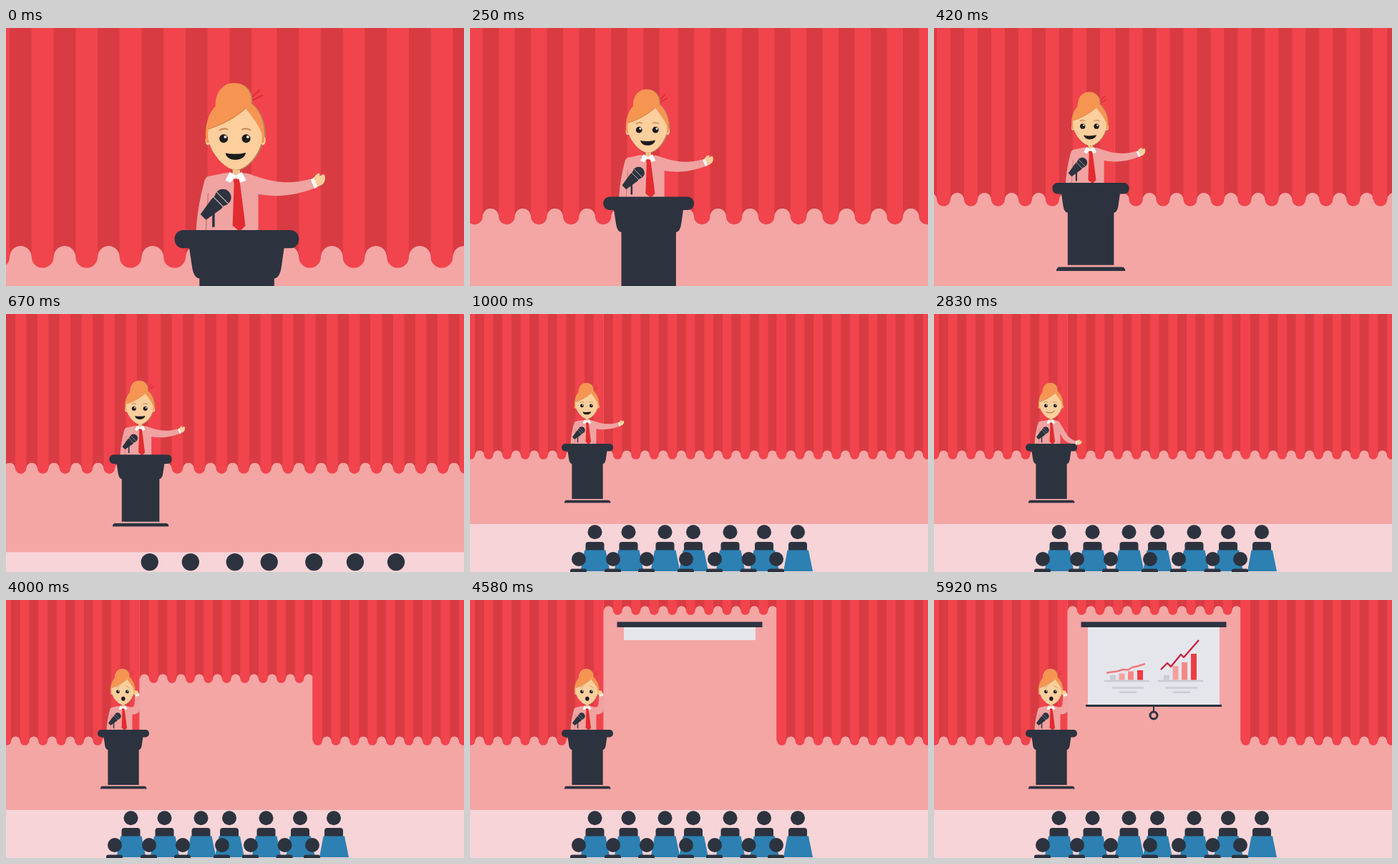
These frames come from a looping animation (640 px wide and 360 px high, 6.01 s). An HTML page:

```html
<!DOCTYPE html>
<html lang="en">
<head>
<meta charset="utf-8">
<title>Presentation</title>
<style>
html, body { margin: 0; width: 100%; height: 100%; overflow: hidden; background: #f4a6a5; }
svg { display: block; width: 100vw; height: 100vh; }
</style>
</head>
<body>
<svg id="stage" viewBox="0 0 640 360" xmlns="http://www.w3.org/2000/svg"></svg>
<script>
const LOOP = 6010;
const INK = '#2c333f', RED = '#f1444c', DEEP = '#d93b42', BLUE = '#2c80b2';
const SHIRT = '#f0a3a1', SKIN = '#fdcf9d', HAIR = '#f69552', GREY = '#cacbd3';
const ZOOM = 2.417, FX = 51.9, FY = 109.5;   // opening zoom and its fixed point

const clamp = v => Math.max(0, Math.min(1, v));
const span = (t, a, b) => clamp((t - a) / (b - a));
const ease = u => u * u * (3 - 2 * u);
const mix = (a, b, u) => a + (b - a) * u;
const mixAll = (a, b, u) => a.map((v, i) => mix(v, b[i], u));
const zoomAt = s => `translate(${FX} ${FY}) scale(${s}) translate(${-FX} ${-FY})`;
const rect = (x, y, w, h, fill, more = '') =>
  `<rect x="${x}" y="${y}" width="${w}" height="${h}" fill="${fill}" ${more}/>`;
const path = (d, fill, more = '') => `<path d="${d}" fill="${fill}" ${more}/>`;
const line = (d, color, w, more = '') =>
  path(d, 'none', `stroke="${color}" stroke-width="${w}" ${more}`);
const disc = (x, y, r, fill) => `<circle cx="${x}" cy="${y}" r="${r}" fill="${fill}"/>`;
const oval = (x, y, rx, ry, fill) =>
  `<ellipse cx="${x}" cy="${y}" rx="${rx}" ry="${ry}" fill="${fill}"/>`;

// Folds alternate: dark ones arch up, light ones hang down.
const FOLD = 12.735, HEM = 196.5, SEAM = 1;
function curtain(x, folds, darkFirst) {
  const arc = up => `a${FOLD / 2} ${FOLD / 2} 0 0 ${up} ${FOLD} 0`;
  let edge = '', dark = '';
  for (let i = 0; i < folds; i++) {
    const isDark = (i % 2 === 0) === darkFirst;
    edge += arc(isDark ? 1 : 0);
    if (isDark) dark += `M${x + i * FOLD} -20V${HEM}${arc(1)}V-20Z`;
  }
  return path(`M${x - SEAM} -20V${HEM}H${x}${edge}h${SEAM}V-20Z`, RED) + path(dark, DEEP);
}
const LEFT = -18.44, MID = LEFT + 16 * FOLD + 1.9, RIGHT = MID + 19 * FOLD;

function chart(bars, base, points, color, id) {
  const fills = [GREY, '#f5a19d', '#f38a85', '#ee3e44'];
  return line(`M${base} 113h61`, GREY, 2.4, 'stroke-linecap="round"') +
    `<g class="bars">` +
    bars.map(([x, top], i) => rect(x, top, 8, 111.5 - top, fills[i])).join('') + '</g>' +
    line(`M${points}`, color, 2.4,
      `id="${id}" pathLength="1" stroke-dasharray="1 2" stroke-linejoin="round"`) +
    line(`M${base + 11} 122.5h42M${base + 21} 128.7h22`, GREY, 2.4, 'stroke-linecap="round"');
}

const screen =
  `<rect id="panel" x="215" y="37" width="184" fill="#e5e6ec"/>` +
  `<g id="charts">` +
  chart([[246, 105], [258.5, 102.5], [271, 99.5], [284, 98]], 239,
    '241 101.5L256 99.5L264 97L271 97.5L277 94L284 92.5L295 89', '#f07a7b', 'trendA') +
  chart([[321, 105], [333.5, 92], [346, 87], [359, 75]], 314,
    '317 97L326 88L331 93L345 76L349 80L370 56', '#c9213f', 'trendB') +
  `</g><g id="pull">` + rect(212, 146, 190, 3, INK) + rect(306, 149, 2, 7, INK) +
  `<circle cx="307" cy="161" r="5" fill="none" stroke="${INK}" stroke-width="3"/></g>` +
  rect(205.5, 30.5, 203, 7.5, INK);

const eye = x => disc(x, 154.3, 6, '#1e1b1c') + disc(x + 2.3, 152, 1.9, '#fff');
const brow = d => line(d, '#c58a58', 2, 'stroke-linecap="round"');

const bun = fill => path('M293 108C293 90 303 76.700 319 76.700C335 76.700 344 89 343 104L335 116H298Z', fill);
const cap = fill => path('M280 160C275 122 295 97 320 97C345 97 365 122 361 160Z', fill);
const face = fill => path('M283 141C302 135 320 126 335 112C343 122 353 134 358 147C361 170 338 198 321.500 198C305 198 282.500 170 282.500 150Z', fill);
const shade = '#b98058';

// Drawn at the opening zoom, then scaled back into the scene.
const speaker = `<g transform="${zoomAt(1 / ZOOM)}">` +
  path('M307 202.500L284 207Q279 208 277.500 214C271 238 267 262 266 284H353V214C351 208 344 204 336 203Z', SHIRT) +
  line('M283 231L279.500 284', '#c97c7c', 1.5) +
  `<path id="arm" fill="${SHIRT}"/>` +
  rect(317, 188, 10.500, 22, '#f3c48d') +
  path('M313 201L321.500 206L330 201L336 213L328 216L321.500 208L314 216L307 213Z', '#fff') +
  path('M318 211L326 211L327.500 218L335 276L327 284L317 276L319 218Z', '#e22c30') +
  line('M342 99L355 86M344 101.500L359 93.500', '#e22c30', 2.2) +
  `<g transform="translate(2 .5)">` + bun(shade) + cap(shade) + face(shade) + '</g>' +
  oval(282.5, 157, 3.6, 6.5, SKIN) + oval(359.5, 157, 3.6, 6.5, SKIN) +
  bun(HAIR) + cap(HAIR) + face(SKIN) +
  line('M283 141C302 135 320 126 335 112', '#d98a4c', 1.6) +
  eye(304.5) + eye(336) +
  `<g id="calm">` + brow('M299 142.500Q304 139 310 141.500M330.500 141.500Q337 139 342 142.500') + '</g>' +
  `<g id="worry">` + brow('M298 142Q302 136 309 135M332 135Q339 136 343 142') + '</g>' +
  path('M307 174.500Q321 177.500 335.500 174C334 187 309 187.500 307 174.500Z', '#1e1b1c', 'id="grin"') +
  line('M306 176Q323 183 334 171', '#8a4a2b', 2, 'id="smile" stroke-linecap="round"') +
  `<ellipse id="gasp" cx="322.5" cy="178" rx="6.600" ry="7.300" fill="#1e1b1c"/>` +
  `<g id="hand">` +
  path('M0 -6C5 -8 8 -12 13 -10C13 -8 11 -7 12 -6C16 -8 19 -7 18.500 -4C18 1 14 6 8 6.500L0 6Z', SKIN) +
  rect(-2, -7, 5, 14, '#fff', 'rx="1"') + '</g>' +
  rect(288.5, 251, 3.5, 27, INK) +
  `<g transform="translate(303.5 236.5) rotate(45)">` + disc(0, 0, 11.5, INK) +
  path('M-9.500 6H9.500V14L5.500 39H-5.500L-9.500 14Z', INK) +
  line('M-11.500 1H11.500M-10 9H10', '#d9b3b5', 1.2) +
  '</g></g>';

const podium = rect(128, 181, 72, 10.4, INK, 'rx="5"') +
  path('M136.300 190H191.600L189.900 202Q189 208.500 185.700 209V258H142.400V209Q139 208.500 138.100 202Z', INK) +
  path('M131.700 263.500Q132 259.800 135 259.800H193Q196.200 259.800 196.500 263.500Z', INK);

const sitter = x => disc(x, 304.3, 10, INK) +
  path(`M${x - 13} 333V322Q${x - 13} 318 ${x - 9} 318H${x + 9}Q${x + 13} 318 ${x + 13} 322V333Z`, INK) +
  path(`M${x - 14.5} 329.500H${x + 15}L${x + 21} 359H${x - 20}Z`, BLUE);
const front = x => disc(x, 342, 10, INK) +
  path(`M${x - 12} 362V358Q${x - 12} 355.500 ${x - 9} 355.500H${x + 8}Q${x + 11} 355.500 ${x + 11} 358V362Z`, INK);
const audience = [174.5, 221.5, 272.5, 312, 363.5, 411, 458].map(sitter).join('') +
  [152, 200, 247, 302, 342, 389.5, 428].map(front).join('');

const stage = document.getElementById('stage');
stage.innerHTML = `<g id="camera">` + rect(-10, -10, 660, 380, '#f4a6a5') + screen +
  `<g id="drape">${curtain(MID, 19, true)}</g>` +
  curtain(LEFT, 16, true) + curtain(RIGHT, 18, false) +
  rect(-10, 293, 660, 80, '#f7d4d7') + speaker + podium + audience + '</g>';

const el = {};
stage.querySelectorAll('[id]').forEach(n => el[n.id] = n);
const bars = stage.querySelectorAll('.bars');
const set = (n, k, v) => n.setAttribute(k, v);
const show = (n, on) => set(n, 'visibility', on ? 'visible' : 'hidden');

// Sleeve outline, eight points; then wrist x, y and hand angle.
const OUT = [332,203, 352,205, 380,224, 426,211, 431,224, 400,236, 376,236, 352,232, 430.5,217, -22];
const LOW = [332,203, 372,214, 362,262, 407,273, 406,284, 375,282, 362,272, 350,240, 407,279, 4];
const HEAD = [332,203, 362,212, 360,208, 362,169, 379,167, 386,212, 380,234, 350,230, 370,167, -102];

function draw(t) {
  // The visible width grows evenly, so the zoom is its reciprocal.
  set(el.camera, 'transform', zoomAt(1 / mix(1 / ZOOM, 1, span(t, 0, 960))));

  const p = t < 2600 ? mixAll(OUT, LOW, ease(span(t, 1500, 1950)))
                     : mixAll(LOW, HEAD, ease(span(t, 3050, 3450)));
  const at = i => p[i] + ' ' + p[i + 1];
  set(el.arm, 'd', `M${at(0)}C${at(2)} ${at(4)} ${at(6)}L${at(8)}C${at(10)} ${at(12)} ${at(14)}Z`);
  set(el.hand, 'transform', `translate(${at(16)}) rotate(${p[18]})`);

  const shocked = t >= 3200;
  show(el.grin, t < 1750);
  show(el.smile, t >= 1750 && !shocked);
  show(el.gasp, shocked);
  show(el.calm, !shocked);
  show(el.worry, shocked);

  set(el.drape, 'transform', `translate(0 ${-182 * ease(span(t, 3550, 4480))})`);

  const bottom = mix(38, 146.5, span(t, 4525, 4865));
  set(el.panel, 'height', bottom - 37);
  set(el.pull, 'transform', `translate(0 ${bottom - 146.5})`);
  show(el.pull, t >= 4660);

  const grow = ease(span(t, 4830, 5080));
  show(el.charts, t >= 4830);
  bars.forEach(b => set(b, 'transform', `translate(0 ${111.5 * (1 - grow)}) scale(1 ${grow})`));
  set(el.trendA, 'stroke-dashoffset', 1 - grow);
  set(el.trendB, 'stroke-dashoffset', 1 - grow);
}

const start = performance.now();
function tick() {
  draw((performance.now() - start) % LOOP);
  requestAnimationFrame(tick);
}
tick();
</script>
</body>
</html>
```
